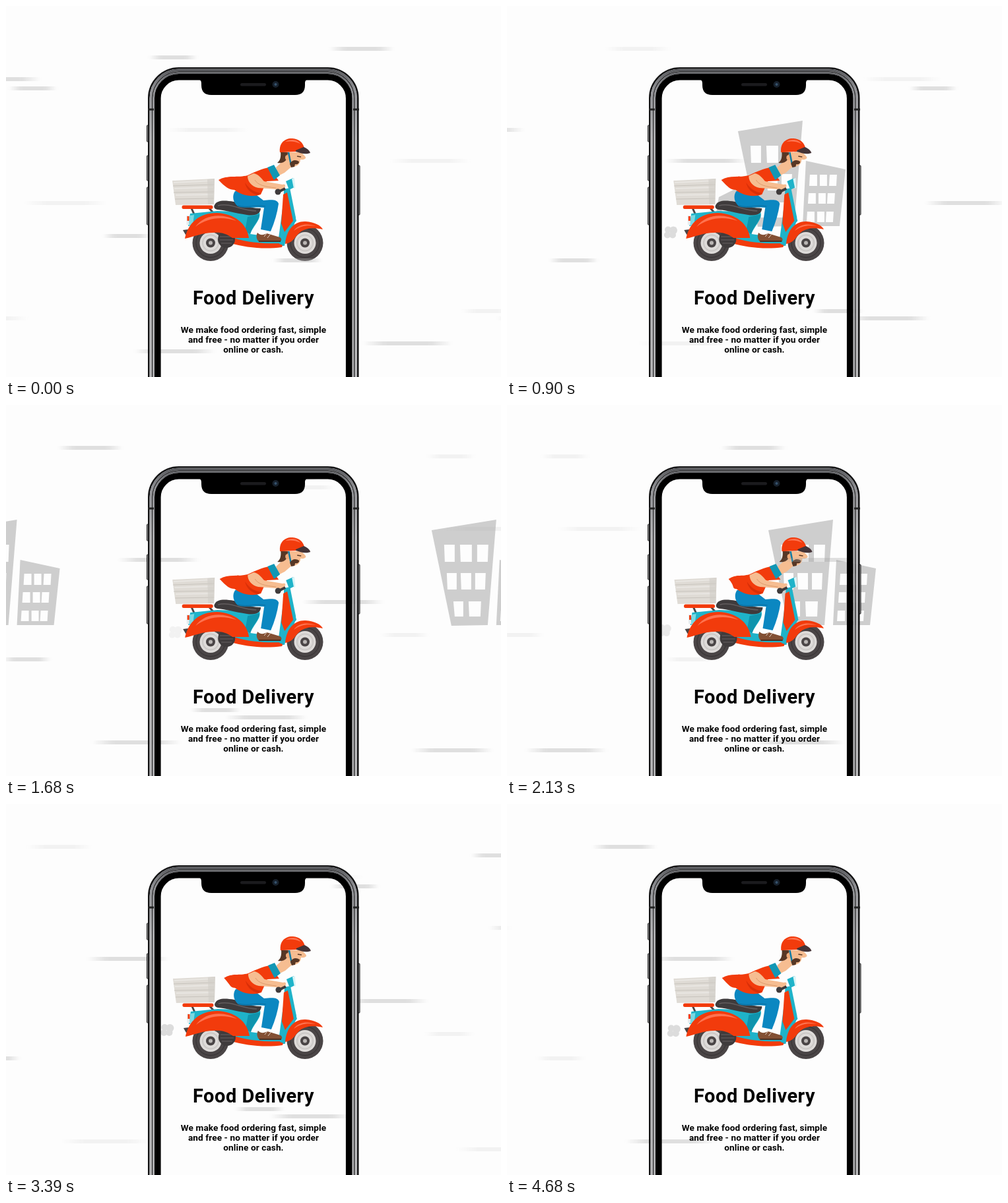
An HTML page for the animation above (4.71 s loop, 750 px wide and 563 px high).

```html
<!DOCTYPE html>
<html lang="en">
<head>
<meta charset="utf-8">
<title>Food Delivery</title>
<style>
  html, body { margin: 0; width: 100%; height: 100%; overflow: hidden; background: #fdfdfd; }
  svg { display: block; width: 750px; height: 563px; }
  text { font-family: Roboto, "Open Sans", sans-serif; font-weight: 700; text-anchor: middle; }
</style>
</head>
<body>
<svg viewBox="0 0 750 563">
  <defs>
    <linearGradient id="fade">
      <stop offset="0" stop-color="#aaa" stop-opacity="0"/>
      <stop offset=".25" stop-color="#aaa"/>
      <stop offset=".75" stop-color="#aaa"/>
      <stop offset="1" stop-color="#aaa" stop-opacity="0"/>
    </linearGradient>
    <linearGradient id="metal" gradientUnits="userSpaceOnUse" x1="0" x2="0" y1="93" y2="200">
      <stop offset="0" stop-color="#505155"/>
      <stop offset=".3" stop-color="#8f9094"/>
      <stop offset="1" stop-color="#b4b4b6"/>
    </linearGradient>
    <filter id="soft" x="-10%" y="-10%" width="120%" height="120%">
      <feGaussianBlur stdDeviation="2 .7"/>
    </filter>
    <g id="towers" fill="#cecece" fill-rule="evenodd">
      <path d="M0 190L98 174 85 334 30 335Z
        M19 212h16v26H20ZM43 212h18v26H44ZM69 212h17l-1 26H69Z
        M23 255h15v25H24ZM44 255h16v25H45ZM66 255h16l-1 25H66Z
        M33 298h15v23H35ZM56 298h19l-1 23H57Z"/>
      <path d="M103 235L163 248 154 334 98 334Z
        M109 256h11v17h-12ZM124 256h11v17h-11ZM139 256h11l-1 17h-11Z
        M107 284h11v16h-12ZM122 284h11v16h-11ZM136 284h11l-1 16h-11Z
        M105 312h11v16h-12ZM120 312h11v16h-11ZM134 312h11l-1 16h-11Z"/>
    </g>
    <g id="wheel">
      <circle r="27.5" fill="#4a4546"/>
      <circle r="22" fill="none" stroke="#353132"/>
      <circle r="16.5" fill="#dedbd9"/>
      <circle r="12" fill="none" stroke="#cbc8c6" stroke-width="2"/>
      <circle r="7" fill="#4a4546"/>
      <circle r="3" fill="#b9b5b3"/>
    </g>
  </defs>

  <g id="cityA">
    <use href="#towers"/>
    <path fill="#cecece" fill-rule="evenodd" d="M-29 290L3 274 11 334-36 334Z
      M-24 304h8v25h-10ZM-13 304h14l1 25h-15Z"/>
  </g>
  <use id="cityB" href="#towers"/>

  <g id="puff" fill="#dcdcdc">
    <circle cx="-4" cy="-4" r="5"/><circle cx="4" cy="-3" r="6"/>
    <circle cx="-5" cy="4" r="5"/><circle cx="3" cy="4" r="5"/>
  </g>

  <use href="#wheel" x="310" y="359.500"/>
  <use href="#wheel" x="453" y="359.500"/>

  <g id="body">
    <g opacity=".85">
      <path fill="#dad6cf" d="M252 265L316 262 315 301 257 302Z"/>
      <path fill="none" stroke="#bfbab2" d="M253 273l62-2M254 283l61-1M256 293l59-1"/>
      <path fill="none" stroke="#e6e3de" stroke-width="2" d="M254 268l60-3M255 277l59-2M257 287l57-1"/>
      <path fill="#c9c5be" opacity=".6" d="M305 263l11-1-1 39h-9Z"/>
    </g>
    <!-- scooter -->
    <path d="M281 307l5 11M308 307l8 9" stroke="#4a4546" stroke-width="3"/>
    <rect x="266.500" y="302.500" width="47" height="5.500" rx="2.500" fill="#f23b0c"/>
    <path fill="#1fb3c9" d="M279 315L320 311 384 313C387 324 375 333 370 346L413 352 420 300 430 290 440 326C430 338 424 346 421 364L372 366 340 352 300 330 276 334Z"/>
    <path fill="#7bd9e2" d="M279 318l6-1-2 16h-6Z"/>
    <path fill="#0f94ad" d="M366 320l18-4c0 10-10 16-14 30l-8-4Z"/>
    <rect x="273.500" y="318" width="4" height="14" fill="#e8edf0"/>
    <rect x="274.500" y="319" width="3" height="7" fill="#f23b0c"/>
    <path fill="#4a4546" d="M268 340l16-2 4 8-16 1Z"/>
    <path fill="#f23b0c" d="M345 352C370 360 395 361 420 360L418 366C390 370 362 366 340 360Z"/>
    <circle cx="334" cy="354" r="13" fill="#3f3b3c"/>
    <path d="M324 350h20M324 355h20M326 360h16" stroke="#666162"/>
    <path fill="#f23b0c" d="M271 353C276 329 293 314 319 314 346 315 365 330 368 352L343 352C334 345 324 343 314 344 297 344 286 350 271 353Z"/>
    <path fill="#ff7350" d="M287 335C301 315 330 314 349 326 327 319 306 321 287 335Z"/>
    <path fill="#3f3b3c" d="M316 302C320 294 332 295 345 297 360 300 372 308 386 307 386 315 378 319 365 317 346 314 333 310 320 309 316 308 314 305 316 302Z"/>
    <path fill="none" stroke="#625d5e" stroke-width="1.500" d="M321 303c20-5 35 8 58 8"/>
    <path fill="#1fb3c9" d="M421 278l9-2 9 45c-2 20-14 28-17 43l-8-3 6-41Z"/>
    <path fill="#f23b0c" d="M420 286l6-3 9 43-13 17-5-13Z"/>
    <!-- rider -->
    <path fill="#fff" d="M384 338l14 3 3 8-16 3Z"/>
    <path fill="#835034" d="M381 344c5 5 10 3 14 1l20 6c3 2 3 5 0 7h-31c-4-2-6-9-3-14Z"/>
    <path d="M383 357h33" stroke="#4b3023" stroke-width="2"/>
    <path d="M395 345l-4 5M400 347l-4 5" stroke="#e5d4c8"/>
    <path fill="#0b87c1" d="M347 281C342 288 344 298 351 304 362 308 380 304 391 306L386 339 401 342C407 328 411 314 413 300 411 293 402 294 390 295L372 281Z"/>
    <path fill="none" stroke="#0a6e9f" d="M351 303c16 4 28-2 42 1"/>
    <path id="shirt" fill="#f23b0c"/>
    <path fill="#d92f08" d="M362 268c6 9 13 14 24 16l-5 3c-10-3-17-9-19-19Z"/>
    <path fill="#f6bd91" d="M409 245l13-12 14 8-14 12-10 5Z"/>
    <path fill="#1297b5" d="M396 245l10-4 9 16-9 7Z"/>
    <path fill="#f6bd91" d="M375 254C383 255 387 262 391 266L419 271C423 269 425 273 421 277L417 281 408 278 382 276C372 274 366 266 366 258Z"/>
    <path fill="none" stroke="#dd9c6d" d="M377 264c5 8 14 10 32 12"/>
    <path fill="#f6bd91" d="M422 222L448 222C450 226 455 228 454 231 451 234 448 233 446 233 446 240 441 243 436 244L427 244 420 238Z"/>
    <path fill="#573725" d="M416 221l11 1-1 8c-2 7-8 9-15 8 4-3 6-8 5-17Z"/>
    <circle cx="427" cy="230" r="4" fill="#efaa79"/>
    <path d="M428 222l4 20" stroke="#117ca5" stroke-width="2.500"/>
    <path fill="#573725" d="M430 239c4-6 9-6 14-3 0 4-4 5-6 4l-1 4-5 1Z"/>
    <path d="M441 228l6 1" stroke="#573725" stroke-width="1.500"/>
    <path fill="#f23b0c" d="M415 222C413 208 423 200 434 201 444 202 450 207 452 216L441 221Z"/>
    <path fill="#ff7350" d="M423 206c7-5 18-4 23 3-8-4-16-4-23-3Z"/>
    <path fill="#453437" d="M439 219L451 214C456 216 460 219 461 223 453 226 446 223 439 221Z"/>
    <!-- handlebar -->
    <path fill="#1fb3c9" d="M424 266l11-5 2 14-8 4Z"/>
    <path fill="#d9f4f7" d="M433 262l4-1 1 15-2 1Z"/>
    <path d="M411 283l12-6" stroke="#3f3b3c" stroke-width="4"/>
    <circle cx="412" cy="282" r="4.500" fill="#3f3b3c"/>
  </g>
  <path fill="#f23b0c" d="M423 361C425 338 438 326 454 327 468 328 477 333 480 339 466 336 454 337 446 343 438 349 436 359 423 361Z"/>
  <path fill="#ff7350" d="M436 341c8-11 22-11 33-7-14-2-23 0-33 7Z"/>

  <g id="wind" filter="url(#soft)"></g>

  <!-- phone -->
  <g fill="#9a9a9c" stroke="#1a1a1a">
    <rect x="213.500" y="181" width="3" height="25" rx="1"/>
    <rect x="213.500" y="227" width="3" height="38" rx="1"/>
    <rect x="213.500" y="275" width="3" height="57" rx="1"/>
    <rect x="533" y="242" width="3" height="75" rx="1"/>
  </g>
  <g id="frame" fill="none"></g>
  <path d="M215 157h9M526 157h9" stroke="#222" stroke-width="3"/>
  <path d="M291 111h167c-4 1-5 3-5 7v2c0 10-5 15-15 15H311c-10 0-15-5-15-15v-2c0-4-1-6-5-7Z"/>
  <rect x="355" y="117" width="39" height="4.500" rx="2.200" fill="#1b1b1e"/>
  <circle cx="408.500" cy="119" r="5" fill="#17202b"/>
  <circle cx="408.500" cy="119" r="2" fill="#36516b"/>

  <text x="375" y="453" font-size="29" letter-spacing=".5">Food Delivery</text>
  <g font-size="13.600" letter-spacing=".1">
    <text x="375" y="496">We make food ordering fast, simple</text>
    <text x="375" y="511">and free - no matter if you order</text>
    <text x="375" y="526">online or cash.</text>
  </g>
</svg>
<script>
const LOOP = 4710, STEP = 30, CYCLE = 2400;
const WIND_SPEED = 1.303, CITY_SPEED = 0.553;
const copies = [0, 832, 1778, 2610];
// x, y, width, bit mask of the copies in which the streak is pale
const streaks = [
  [490, 65, 98, 2], [217, 78, 73, 8], [-65, 111, 117, 4], [5, 125, 72, 8],
  [244, 188, 123, 9], [581, 235, 123, 1], [29, 299, 122, 1], [147, 349, 73, 14],
  [405, 386, 74, 8], [-141, 463, 75, 3], [-88, 474, 123, 1], [541, 512, 135, 2],
  [194, 524, 123, 6]
];
const $ = id => document.getElementById(id);

function add(parent, name, attrs) {
  const el = document.createElementNS('http://www.w3.org/2000/svg', name);
  for (const key in attrs) el.setAttribute(key, attrs[key]);
  return parent.appendChild(el);
}
const move = (el, x, y = 0) => el.setAttribute('transform', `translate(${x} ${y})`);

const windCopies = copies.map((_, i) => {
  const group = add($('wind'), 'g', {});
  for (const [x, y, width, pale] of streaks)
    add(group, 'rect', { x, y: y - 3, width, height: 6, rx: 3, fill: 'url(#fade)',
      opacity: pale >> i & 1 ? 0.12 : 0.36 });
  return group;
});

// nested outlines: inset, line width, colour
for (const [inset, width, stroke] of [
  [1.3, 2.6, '#121213'], [4.3, 3.4, 'url(#metal)'], [6.8, 1.6, '#2c2c2e'],
  [8.8, 2.4, 'url(#metal)'], [14.8, 9.6, '#000']
]) add($('frame'), 'rect', { x: 215 + inset, y: 93 + inset, width: 319.5 - 2 * inset,
  height: 600, rx: 47 - inset, stroke, 'stroke-width': width });

function draw(now) {
  const t = Math.floor(now % LOOP / STEP) * STEP;
  const u = t % CYCLE;
  windCopies.forEach((group, i) => move(group, copies[i] - WIND_SPEED * u));
  move($('cityA'), 549 - CITY_SPEED * (t - 540));
  move($('cityB'), 396 - CITY_SPEED * (t - 2130));

  const sway = 1 - Math.cos(u / 800 * 2 * Math.PI);
  move($('body'), sway);
  const tail = 322 + 8 * sway;
  $('shirt').setAttribute('d', `M${tail} 264C${tail + 13} 256 352 261 366 257 377 252 387 247 399 245
    L413 265 395 266 386 286C372 291 356 287 346 279 339 279 ${tail + 10} 275 ${tail} 264Z`);

  const age = (u - 150) / 500, phase = age % 1;
  move($('puff'), 258 - 20 * phase, 345 - 3 * phase);
  $('puff').setAttribute('opacity', age < 0 ? 0 : Math.min(1, phase * 5, 0.5 + (1 - phase) * 2));
}

const start = performance.now();
function tick() {
  draw(performance.now() - start);
  requestAnimationFrame(tick);
}
tick();
</script>
</body>
</html>
```
